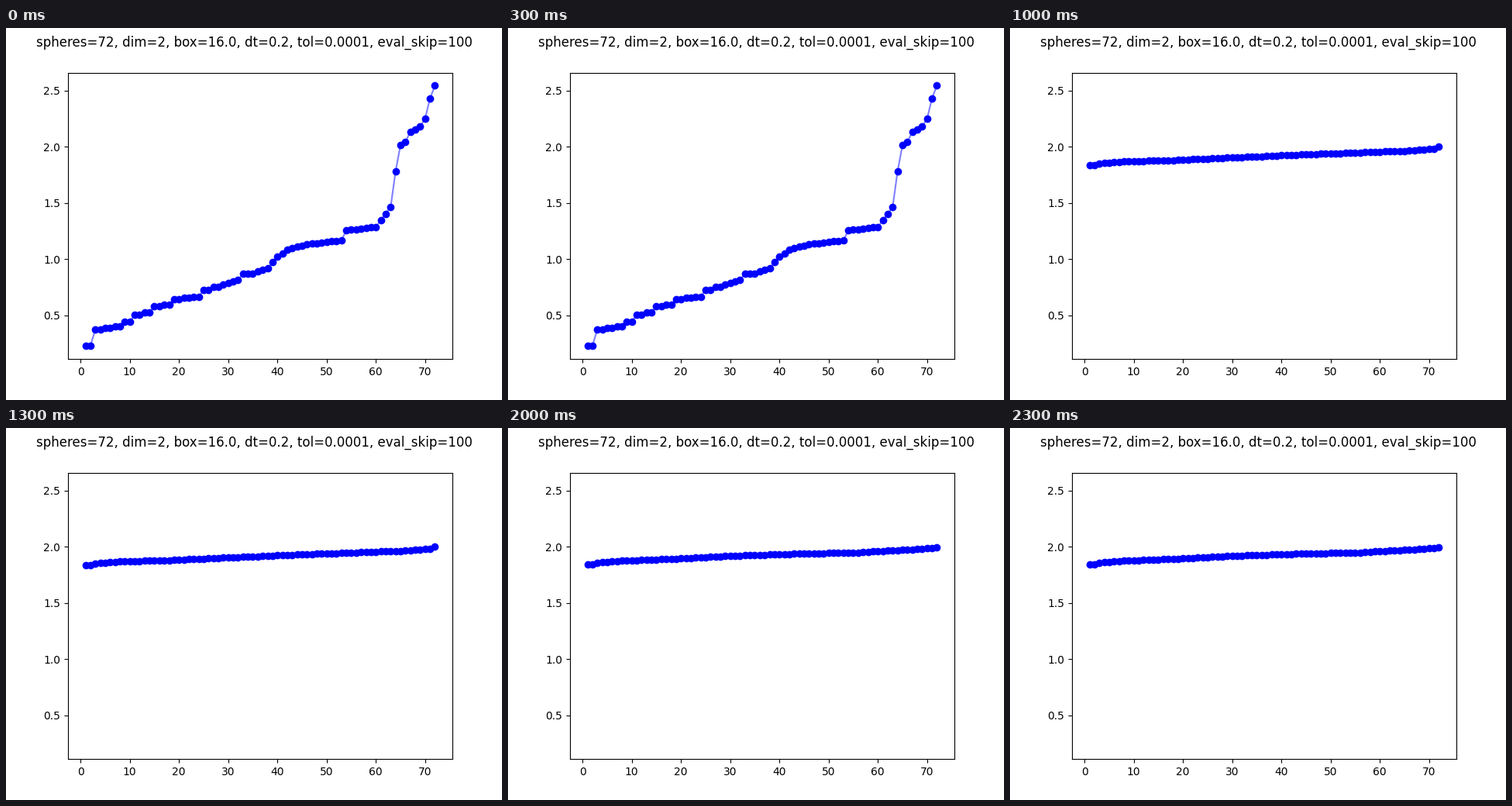
Write a matplotlib script that moves like this. It is 640 px wide and 480 px high and loops after 2.5 s.

```python
import numpy as np
import matplotlib.pyplot as plt
from matplotlib.animation import FuncAnimation

TITLE = "spheres=72, dim=2, box=16.0, dt=0.2, tol=0.0001, eval_skip=100"
INDEX = np.arange(1, 73)
PAIRED = 28  # up to here neighbours come in pairs with equal distance

# Key points (index, distance) of the unsettled curve
START = [
    (1, .228), (3, .373), (7, .40), (9, .44), (11, .505), (13, .523),
    (15, .58), (17, .594), (19, .642), (23, .664), (25, .725), (30, .788),
    (32, .815), (33, .87), (35, .873), (38, .919), (40, 1.022), (42, 1.084),
    (46, 1.133), (53, 1.167), (54, 1.255), (60, 1.287), (63, 1.463),
    (64, 1.78), (65, 2.015), (66, 2.043), (67, 2.133), (69, 2.181),
    (70, 2.25), (71, 2.43), (72, 2.545),
]

# Distances of the settled curves at shared key indices
KNOTS = [2, 3, 9, 18, 30, 42, 56, 66, 70, 71, 72]
SETTLED = [
    [1.829, 1.843, 1.850, 1.864, 1.878, 1.905, 1.940, 1.960, 1.967, 1.995, 1.995],
    [1.836, 1.850, 1.871, 1.880, 1.905, 1.926, 1.950, 1.964, 1.981, 1.981, 2.002],
    [1.829, 1.843, 1.871, 1.887, 1.909, 1.933, 1.950, 1.971, 1.981, 1.981, 1.995],
    [1.843, 1.857, 1.878, 1.891, 1.919, 1.936, 1.950, 1.974, 1.988, 1.988, 1.995],
]


def start_curve():
    first_of_pair = INDEX - (INDEX + 1) % 2
    return np.interp(np.where(INDEX <= PAIRED, first_of_pair, INDEX),
                     *np.transpose(START))


curves = [start_curve()] + [np.interp(INDEX, KNOTS, v) for v in SETTLED]

plt.rcParams["font.family"] = "DejaVu Sans"
fig, ax = plt.subplots(figsize=(6.4, 4.8), dpi=100)
fig.suptitle(TITLE, fontsize=12)
ax.set_xlim(-2.55, 75.55)
ax.set_ylim(0.11, 2.66)
line, = ax.plot(INDEX, curves[0], "b-", alpha=0.5)
dots, = ax.plot(INDEX, curves[0], "bo")


def draw(frame):
    for artist in (line, dots):
        artist.set_ydata(curves[frame])
    return line, dots


anim = FuncAnimation(fig, draw, frames=len(curves), interval=500, repeat=True)
plt.show()
```
